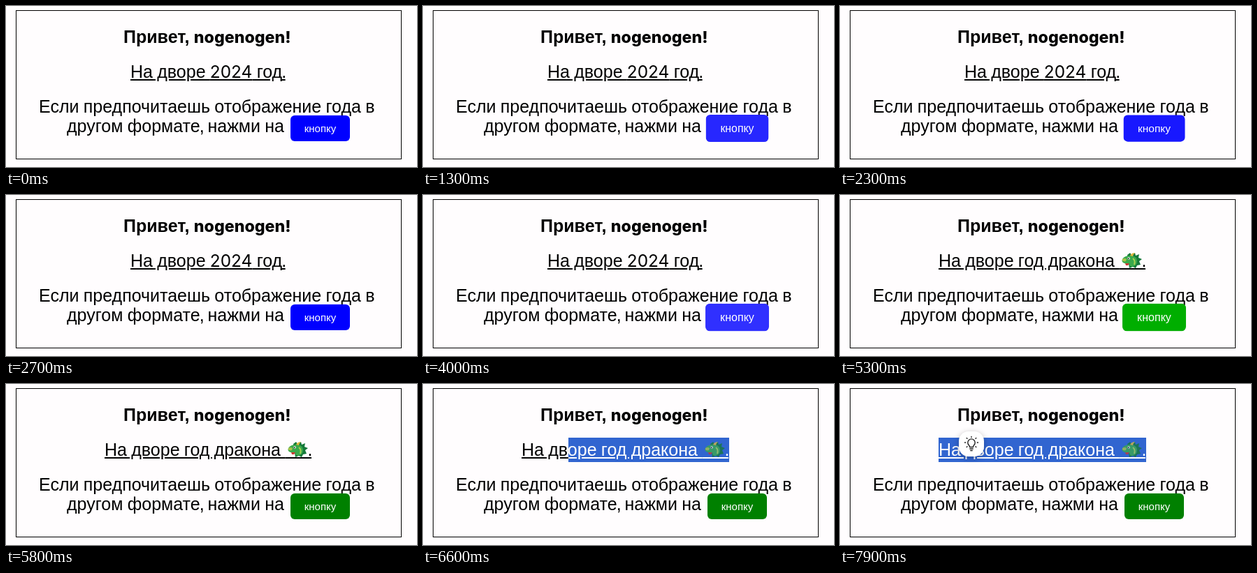
An HTML page for the animation above (8 s loop, 588 by 231 pixels).

```html
<!DOCTYPE html>
<html lang="ru">
<head>
<meta charset="utf-8">
<title>Какой сейчас год</title>
<style>
html, body { margin: 0; width: 100%; height: 100%; overflow: hidden; background: #fffdfe; }
.stage {
  position: relative; width: 588px; height: 231px; overflow: hidden;
  font: 25px/28px "Liberation Sans", Arial, sans-serif; word-spacing: -.65px;
  color: #000; white-space: nowrap;
}
.stage > *, .dragon { position: absolute; margin: 0; }
.card { left: 14px; top: 6px; width: 550px; height: 212px; border: 1px solid #000; }
h1 { left: 168px; top: 30px; font: inherit; font-weight: 700; }
.name { font: 800 23.2px/0 Inter, sans-serif; }
.year { text-decoration: underline; top: 80px; }
.digits { font: 24.4px/0 Inter, sans-serif; }
.mark { margin-left: -1px; letter-spacing: -1.5px; }
.gap { letter-spacing: 27.1px; }
.dragon { left: 261px; top: 0; width: 30px; height: 27px; }

.number { left: 178px; animation: number 8s step-end infinite; }
.animal { left: 141px; animation: animal 8s step-end infinite; }
.selected {
  left: 141px; top: 77px; width: 297px; height: 32px; padding-top: 3px; overflow: hidden;
  background: #3165d0; color: #fff; text-decoration: underline;
  animation: select 8s step-end infinite;
}
.selected .dragon { top: 3px; opacity: .78; }

.line1 { left: 47px; top: 130px; }
.line2 { left: 87px; top: 158px; }
.button {
  left: 407.4px; top: 157px; width: 85px; height: 37px; border-radius: 6px;
  font-size: 15px; line-height: 37px; text-align: center; color: #fff; background: #00f;
  animation: button 8s ease infinite;
}
.bulb {
  left: 170px; top: 68px; width: 36px; height: 36px; border-radius: 14px;
  background: #fff; box-shadow: 0 2px 8px rgba(0, 0, 0, .28);
  animation: bulb 8s step-end infinite;
}
.bulb svg { display: block; }

@keyframes number { 0% { visibility: visible } 61.25%, 100% { visibility: hidden } }
@keyframes animal { 0% { visibility: hidden } 61.25%, 100% { visibility: visible } }
@keyframes select {
  0% { clip-path: inset(0 0 0 297px) }
  78.75% { clip-path: inset(0 0 0 260px) }
  80% { clip-path: inset(0 0 0 201px) }
  81.25% { clip-path: inset(0 0 0 108px) }
  82.5% { clip-path: inset(0 0 0 67px) }
  83.75% { clip-path: inset(0 0 0 39px) }
  85% { clip-path: inset(0 0 0 32px) }
  87.5% { clip-path: inset(0 0 0 18px) }
  92.5%, 100% { clip-path: inset(0) }
}
@keyframes button {
  0%, 13.125% { background: #00f; transform: none }
  19.375%, 26.875% { background: #3030ff; transform: scale(1.07) }
  33.4%, 44.375% { background: #00f; transform: none }
  50%, 60.625% { background: #3030ff; transform: scale(1.07) }
  66.25%, 66.6% { background: #00ae00; transform: scale(1.07) }
  72.5%, 100% { background: #008000; transform: none }
}
@keyframes bulb {
  0% { opacity: 0; transform: scale(.85) }
  97.5% { opacity: .5; transform: scale(.92) }
  98.75%, 100% { opacity: 1; transform: none }
}
</style>
</head>
<body>
<svg width="0" height="0" style="position:absolute">
  <symbol id="dragon" viewBox="0 0 30 27">
    <path d="M9 6L13 3L15 6L20 3L21 7L26 5L25 10L30 12L26 15L28 20L23 21L21 25L17 23L12 25Z" fill="#16793a"/>
    <path d="M2 12Q5 7 13 7Q22 7 23 14Q23 22 16 23Q12 23 12 19L5 18Q0 16 2 12Z" fill="#3aa94b"/>
    <path d="M2 12Q5 10 8 12L7 15Q3 16 2 14Z" fill="#a9c247"/>
    <path d="M6 18L12 18L10 21L7 21Z" fill="#c93a32"/>
    <path d="M17 11Q21 14 19 20" fill="none" stroke="#a9d354" stroke-width="2"/>
    <path d="M13 7Q15 3 20 3Q17 5 17 8Z" fill="#e0b83e"/>
    <circle cx="11" cy="11" r="1.8" fill="#fff"/>
    <circle cx="10.6" cy="11.2" r="1" fill="#222"/>
  </symbol>
</svg>
<div class="stage">
  <div class="card"></div>
  <h1>Привет, <span class="name">nogenogen!</span></h1>
  <p class="year number">На дворе <span class="digits">2024</span> год<span class="mark">.</span></p>
  <p class="year animal">На дворе год дракона <span class="gap">&nbsp;</span><span class="mark">.</span><svg class="dragon"><use href="#dragon"/></svg></p>
  <div class="selected">На дворе год дракона <span class="gap">&nbsp;</span><span class="mark">.</span><svg class="dragon"><use href="#dragon"/></svg></div>
  <p class="line1">Если предпочитаешь отображение года в</p>
  <p class="line2">другом формате<span class="mark">,</span> нажми на</p>
  <div class="button">кнопку</div>
  <div class="bulb">
    <svg width="36" height="36" fill="none" stroke="#222" stroke-width="1.4" stroke-linecap="round">
      <path d="M15.5 22.5Q15.5 21 14.4 19.8A5.2 5.2 0 1 1 21.6 19.8Q20.5 21 20.5 22.5ZM15.8 25H20.2M16.8 27.5H19.2"/>
      <path d="M18 7.5V8.5M11.2 9.5L12 10.3M24.8 9.5L24 10.3M8.5 16H9.7M26.3 16H27.5M11.2 22.6L12 21.8M24.8 22.6L24 21.8"/>
    </svg>
  </div>
</div>
</body>
</html>
```
